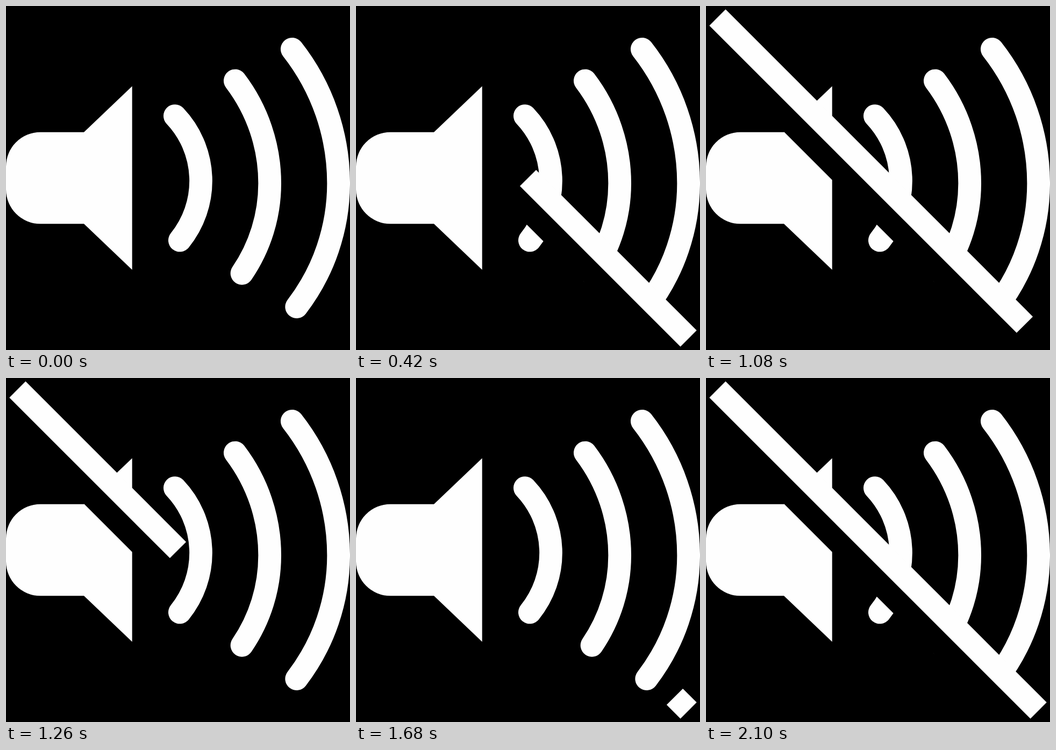
Write an HTML page without scripts that moves like this. It is 640x640 px and loops after 2520 ms.

```html
<!DOCTYPE html>
<html lang="en">
<head>
<meta charset="utf-8">
<title>Mute toggle</title>
<style>
  @property --k { syntax: "<number>"; inherits: true; initial-value: -8; }

  html, body { margin: 0; height: 100%; overflow: hidden; background: #000; }
  svg { display: block; width: 100%; height: 100%; }
  .speaker { fill: #fefefe; }
  .waves, .slash { fill: none; stroke: #fefefe; stroke-width: 42.67; }
  .waves { stroke-linecap: round; }
  .slash { animation: slide 2520ms -2ms infinite; }

  /* Smoothstep over eight steps: k² (12 - k) / 256, mirrored for negative k */
  .slash path {
    --abs: max(var(--k), -1 * var(--k));
    stroke-dasharray: 256 800;
    stroke-dashoffset: calc(var(--k) * var(--abs) * (12 - var(--abs)) * 1px);
  }
  .slash .gap { stroke: #000; stroke-width: 62.9; }

  /* -8: hidden at the lower right, 0: full length, 8: hidden at the upper left */
  @keyframes slide {
    0%, 7.143%, 64.286% { --k: -8; animation-timing-function: steps(8); }
    26.19%, 40.476% { --k: 0; animation-timing-function: steps(8); }
    59.524% { --k: 8; animation-timing-function: step-end; }
    83.333%, 100% { --k: 0; }
  }
</style>
</head>
<body>
<svg viewBox="0 0 640 640">
  <path class="speaker" d="M64 234.67H145L234.67 149.33V490.67L145 405.33H64A64 64 0 0 1 0 341.33V298.67A64 64 0 0 1 64 234.67Z"/>
  <g class="waves">
    <path d="M314.3 204.5A175.7 175.7 0 0 1 323.3 436"/>
    <path d="M426.3 139A315.4 315.4 0 0 1 490.67 330A296.5 296.5 0 0 1 439 497.3"/>
    <path d="M532.3 80.3A404 404 0 0 1 618.67 330A377.2 377.2 0 0 1 540.7 559.7"/>
  </g>
  <g class="slash">
    <path class="gap" pathLength="256" d="M-.92 43.58L596.42 640.92"/>
    <path pathLength="256" d="M21.33 21.33L618.67 618.67"/>
  </g>
</svg>
</body>
</html>
```
